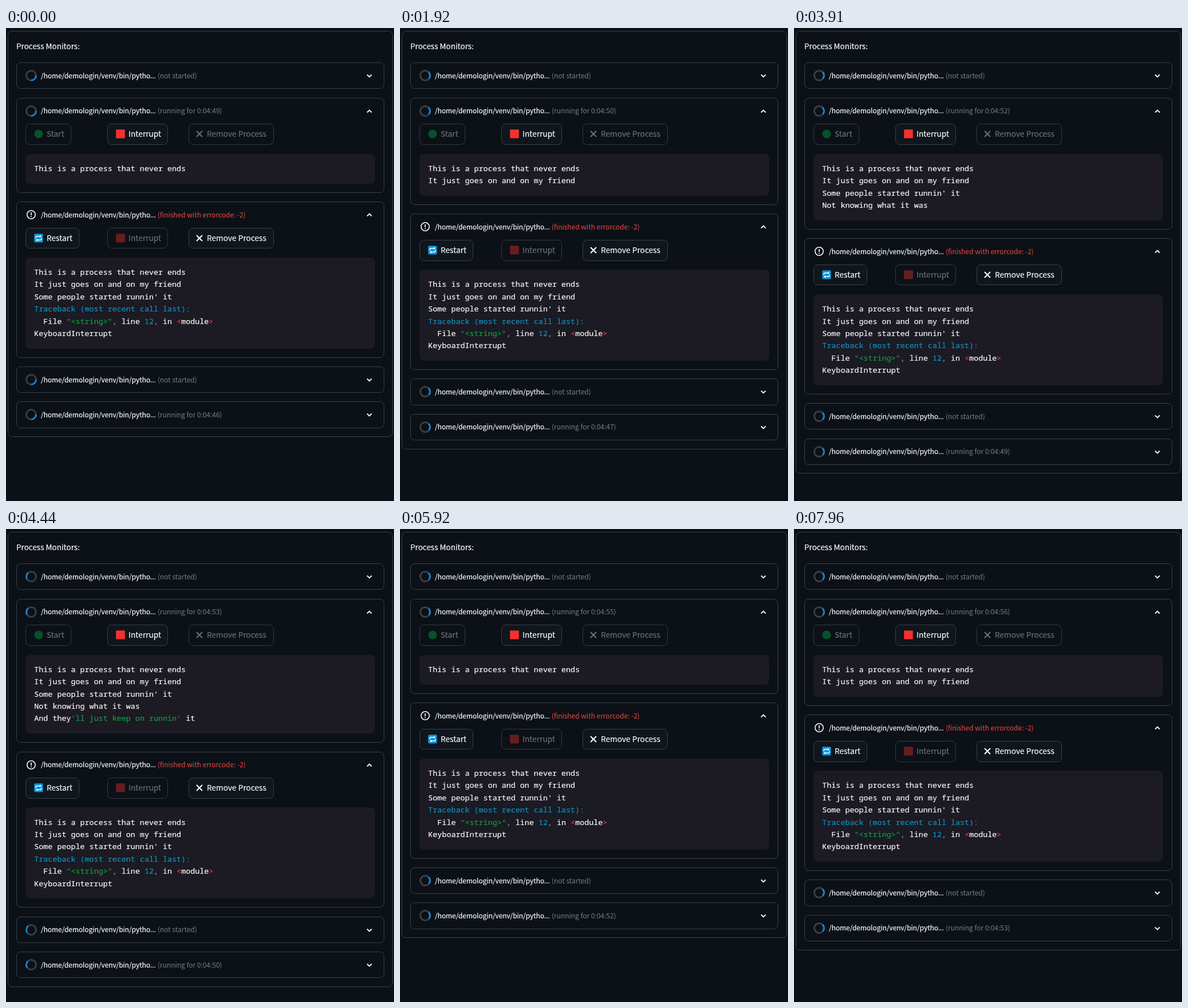
An HTML page that plays this animation: 678 by 826 pixels, repeating every 8 s.

```html
<!DOCTYPE html>
<html lang="en">
<head>
<meta charset="utf-8">
<title>Process Monitors</title>
<style>
  html, body { margin: 0; width: 100%; height: 100%; overflow: hidden; background: #0b1117; }
  body {
    position: relative; color: #fafafa;
    font-family: "Noto Sans CJK JP", "Noto Sans CJK SC", "Noto Sans", sans-serif;
    -webkit-text-stroke: .2px currentColor;
  }
  svg { display: block; overflow: visible; }
  .panel, .card, .button {
    box-sizing: border-box; border: 1px solid #3b4046; border-radius: 7.6px;
  }
  .panel { position: absolute; left: 3px; top: 5px; width: 673px; padding: 54.4px 14px 14.6px; }
  .card { position: relative; height: 46.1px; }
  .card + .card { margin-top: 15.3px; }
  .card.open { height: auto; padding: 96.8px 15px 15.1px; }
  .card > :not(.code), .title { position: absolute; white-space: pre; line-height: 20px; }
  .title { left: 14px; top: 15px; font-size: 13.5px; }
  .spinner {
    box-sizing: border-box; left: 15px; top: 12px; width: 20px; height: 20px;
    border: 3px solid #393e44; border-top-color: #1c85d2; border-radius: 50%;
  }
  .alert { left: 17px; top: 14px; }
  .path { left: 42px; top: 11.6px; font-size: 11.9px; }
  .label { left: 246px; top: 11.6px; font-size: 11.95px; color: #7b7f84; -webkit-text-stroke: 0; }
  .label.failed { color: #f04843; }
  .chevron { left: 611px; top: 16px; }
  .card > .button { top: 44.6px; height: 36.6px; line-height: 33.6px; font-size: 13.7px; background: #0f161d; }
  .button svg { position: absolute; left: 14px; top: 9px; }
  .button span { position: absolute; left: 36px; }
  .button.remove svg { left: 10px; }
  .button.remove span { left: 31px; }
  .card > .button.off { background: none; border-color: #343a40; }
  .button.off > * { opacity: .4; }
  .code {
    padding: 15.3px; border-radius: 7.6px; background: #1c1a22; white-space: pre;
    font: 13.39px/21.4px "Noto Sans Mono", "DejaVu Sans Mono", monospace;
  }
  .code div { height: 21.4px; }
  .blue { color: #0993c4; }
  .green { color: #109f45; }
  .red { color: #e8453c; }
  .gray { color: #8b8e94; }
</style>
</head>
<body>
<div class="panel"><div class="title">Process Monitors:</div></div>
<script>
const LOOP = 8000;
const STEP = 67.2;
const SPIN_START = 135, SPIN_PER_STEP = 24;
const OUTPUT_STEPS = [14, 29, 44, 59, 73, 88, 104];

const span = (color, text) => `<span class="${color}">${text}</span>`;
const song = [
  "This is a process that never ends",
  "It just goes on and on my friend",
  "Some people started runnin' it",
  "Not knowing what it was",
  `And they${span("green", "'ll just keep on runnin'")} it`,
  "forever just because"
];
const traceback = [
  span("blue", "Traceback (most recent call last):"),
  `  File ${span("green", '"&lt;string&gt;"')}${span("gray", ",")} line ${span("blue", "12")}` +
    `${span("gray", ",")} in ${span("red", "&lt;")}module${span("red", "&gt;")}`,
  "KeyboardInterrupt"
];

const icon = shapes => `<svg width="16" height="16" fill="none">${shapes}</svg>`;
const icons = {
  circle: icon('<circle cx="8" cy="8" r="7.6" fill="#00b54c"/>'),
  square: icon('<rect x=".2" y=".2" width="15.6" height="15.2" rx=".8" fill="#f5302f"/>'),
  cross: icon('<path d="M3 3l10 10M13 3L3 13" stroke="#fafafa" stroke-width="2.2"/>'),
  repeat: icon('<rect x=".2" y=".2" width="15.4" height="15.4" rx="2" fill="#0f95dc"/>' +
    '<path d="M3.2 8V6.8q0-2 2-2H11M12.8 8v1.2q0 2-2 2H5" stroke="#fff" stroke-width="1.5"/>' +
    '<path d="M10 2.6l3.2 2.2L10 7zM6 9L2.8 11.2 6 13.4z" fill="#fff"/>'),
  alert: '<svg class="alert" width="16" height="16" fill="none" stroke="#fafafa">' +
    '<circle cx="8" cy="8" r="7.2" stroke-width="1.6"/><path d="M8 4v5M8 10.4v1.8" stroke-width="1.7"/></svg>'
};

const button = (left, width, name, text, kind) =>
  `<div class="button ${kind}" style="left:${left}px;width:${width}px">${icons[name]}<span>${text}</span></div>`;
const codeLines = lines => lines.map(line => `<div>${line}</div>`).join("");

function addCard({ label = "", failed = false, buttons, lines = [] }) {
  const card = document.createElement("div");
  card.className = buttons ? "card open" : "card";
  const chevron = buttons ? "M1 8.5l4-4 4 4" : "M1 4.5l4 4 4-4";
  card.innerHTML =
    (failed ? icons.alert : '<div class="spinner"></div>') +
    '<div class="path">/home/demologin/venv/bin/pytho...</div>' +
    `<div class="label ${failed ? "failed" : ""}">${label}</div>` +
    `<svg class="chevron" width="10" height="12" fill="none"><path d="${chevron}" stroke="#fafafa" stroke-width="1.8"/></svg>` +
    (buttons ? buttons.join("") + `<div class="code">${codeLines(lines)}</div>` : "");
  document.querySelector(".panel").append(card);
  return card;
}

addCard({ label: "(not started)" });
const active = addCard({
  buttons: [
    button(15, 80, "circle", "Start", "off"),
    button(158, 106, "square", "Interrupt", ""),
    button(300, 149, "cross", "Remove Process", "remove off")
  ]
});
addCard({
  label: "(finished with errorcode: -2)",
  failed: true,
  buttons: [
    button(15, 94, "repeat", "Restart", ""),
    button(158, 106, "square", "Interrupt", "off"),
    button(300, 149, "cross", "Remove Process", "remove")
  ],
  lines: [...song.slice(0, 3), ...traceback]
});
addCard({ label: "(not started)" });
const folded = addCard({});

const spinners = document.querySelectorAll(".spinner");
const output = active.querySelector(".code");
const setClock = (card, seconds) => {
  card.querySelector(".label").textContent = `(running for 0:04:${seconds})`;
};

let shownStep = -1, shownTick = -1;
function render(time) {
  const step = Math.floor(time / STEP);
  if (step === shownStep) return;
  shownStep = step;
  for (const spinner of spinners)
    spinner.style.transform = `rotate(${SPIN_START + SPIN_PER_STEP * step}deg)`;

  const tick = OUTPUT_STEPS.filter(s => s <= step).length;
  if (tick === shownTick) return;
  shownTick = tick;
  output.innerHTML = codeLines(song.slice(0, tick % song.length + 1));
  setClock(active, 49 + tick);
  setClock(folded, 46 + tick);
}

const start = performance.now();
function frame() {
  render((performance.now() - start) % LOOP);
  requestAnimationFrame(frame);
}
frame();
</script>
</body>
</html>
```
